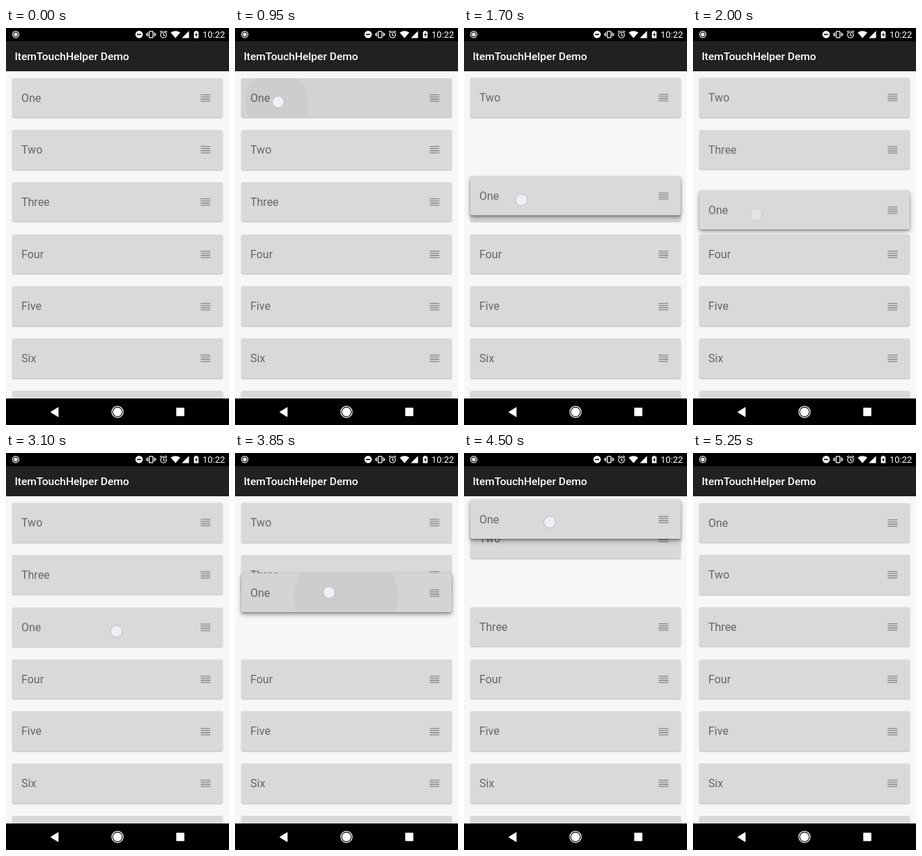
Recreate the animation shown at these times as an HTML page. Size 320x569 px, loop 5.3 s.

```html
<!DOCTYPE html>
<html lang="en">
<head>
<meta charset="utf-8">
<title>ItemTouchHelper Demo</title>
<style>
:root { --loop: 5300ms linear infinite; --soft: cubic-bezier(.37, 0, .63, 1); }
html, body { margin: 0; width: 100%; height: 100%; overflow: hidden; background: #000; }
body { font-family: Roboto, sans-serif; }
#stage { position: relative; width: 320px; height: 569px; overflow: hidden; background: #000; }
#status, #nav { position: absolute; left: 0; width: 320px; }
#status { top: 0; height: 19px; }
#nav { top: 531px; height: 38px; }
#bar {
  position: absolute; top: 19px; width: 320px; height: 43px; background: #212121;
  box-sizing: border-box; padding-left: 12.4px;
  color: #fff; font-size: 15.56px; font-weight: 500; line-height: 44px; white-space: nowrap;
}
#list { position: absolute; top: 62px; width: 320px; height: 469px; overflow: hidden; background: #f7f7f7; }
.card {
  position: absolute; left: 9px; top: calc(9.5px + var(--i) * 74.7px); width: 301.5px; height: 56.5px;
  border-radius: 2.5px; background: #d9d9d9; box-shadow: 0 1px 2px rgba(0, 0, 0, .27);
  color: #666; font-size: 16px; line-height: 58px; text-indent: 13px;
}
.card svg { position: absolute; left: 267.5px; top: 19.3px; width: 18.67px; height: 18.67px; fill: #939393; }

#one { z-index: 2; animation: drag var(--loop); }
#one::after {
  content: ""; position: absolute; inset: 0; border-radius: 2.5px; opacity: 0;
  box-shadow: 0 3px 6px rgba(0, 0, 0, .4); animation: lift var(--loop);
}
#two { animation: two var(--loop); }
#three { animation: three var(--loop); }
.press {
  position: absolute; inset: 0; overflow: hidden; border-radius: 2.5px; opacity: 0;
  background: rgba(0, 0, 0, .025); animation: press var(--loop);
}
.press i {
  position: absolute; left: -75px; top: -41px; width: 150px; height: 150px; border-radius: 50%;
  background: rgba(0, 0, 0, .035); animation: ripple var(--loop);
}
#dot {
  position: absolute; z-index: 3; left: -9px; top: -71px; width: 18px; height: 18px; box-sizing: border-box;
  border-radius: 50%; background: #f0f0f3; border: 1px solid #b4b2d0; opacity: 0;
  animation: finger var(--loop), touch var(--loop);
}

@keyframes drag {
  0%, 18.87% { transform: translateY(0); }
  20.75% { transform: translateY(10px); }
  26.42% { transform: translateY(66.3px); }
  32.83% { transform: translateY(150px); animation-timing-function: ease-out; }
  35.85% { transform: translateY(161.5px); }
  37.36% { transform: translateY(161.5px); animation-timing-function: var(--soft); }
  42.08%, 68.87% { transform: translateY(149.4px); }
  72.64% { transform: translateY(100.4px); }
  75.47% { transform: translateY(74.5px); }
  83.96% { transform: translateY(0); }
  84.91% { transform: translateY(-5px); animation-timing-function: ease-out; }
  88.68% { transform: translateY(-9px); }
  90.57% { transform: translateY(-9px); animation-timing-function: var(--soft); }
  95.28%, 100% { transform: translateY(0); }
}
@keyframes lift {
  0%, 18.4% { opacity: 0; }
  20.75%, 37.36% { opacity: 1; }
  42.08%, 68.4% { opacity: 0; }
  70.5%, 90.57% { opacity: 1; }
  95.28%, 100% { opacity: 0; }
}
@keyframes two {
  0%, 27.36% { transform: translateY(0); animation-timing-function: var(--soft); }
  32.08% { transform: translateY(-74.7px); }
  83.96% { transform: translateY(-74.7px); animation-timing-function: var(--soft); }
  88.68%, 100% { transform: translateY(0); }
}
@keyframes three {
  0%, 32.83% { transform: translateY(0); animation-timing-function: var(--soft); }
  37.55% { transform: translateY(-74.7px); }
  75.47% { transform: translateY(-74.7px); animation-timing-function: var(--soft); }
  80.19%, 100% { transform: translateY(0); }
}
@keyframes press {
  0%, 9.43% { opacity: 0; }
  11.3%, 19.8% { opacity: 1; }
  25.5%, 59.43% { opacity: 0; }
  61.3%, 72.64% { opacity: 1; }
  76.4%, 100% { opacity: 0; }
}
@keyframes ripple {
  0%, 9.43% { transform: translateX(51px) scale(0); }
  23.6%, 28% { transform: translateX(51px) scale(1); }
  28.01%, 59.43% { transform: translateX(150px) scale(0); }
  72.64%, 100% { transform: translateX(150px) scale(1); }
}
@keyframes finger {
  0%, 8.49% { transform: translate(61px, 106px); }
  18.87% { transform: translate(62px, 106px); }
  20.75% { transform: translate(63px, 116px); }
  26.42% { transform: translate(69.5px, 171.5px); }
  32.83% { transform: translate(84px, 256px); animation-timing-function: ease-out; }
  35.85%, 40% { transform: translate(90.5px, 267.5px); }
  40.01%, 58.49% { transform: translate(158.5px, 255.5px); }
  68.87% { transform: translate(157px, 253px); }
  72.64% { transform: translate(135px, 200px); }
  75.47% { transform: translate(130px, 178px); }
  83.96% { transform: translate(124px, 104px); }
  84.91% { transform: translate(123px, 99px); animation-timing-function: ease-out; }
  88.68%, 100% { transform: translate(122px, 95px); }
}
@keyframes touch {
  0%, 8.48% { opacity: 0; }
  8.49%, 36.98% { opacity: 1; }
  38.49%, 58.48% { opacity: 0; }
  58.49%, 90.57% { opacity: 1; }
  92.45%, 100% { opacity: 0; }
}
</style>
</head>
<body>
<div id="stage">
  <svg id="status" width="320" height="19" fill="#fff">
    <circle cx="14" cy="9.3" r="4.6" fill="#333" stroke="#c8c8c8" stroke-width="1.4"/>
    <circle cx="14" cy="9.3" r="2.6" fill="#eee"/>
    <circle cx="191" cy="9.3" r="5.3"/>
    <path d="M188 8.5h6v1.6h-6z" fill="#000"/>
    <g fill="none" stroke="#fff" stroke-width="1.2">
      <rect x="205.6" y="4.8" width="5.2" height="9" rx=".6"/>
      <path d="M203.5 6.3v6M212.9 6.3v6M201.7 7.6v3.4M214.7 7.6v3.4"/>
      <circle cx="226" cy="9.8" r="4.2"/>
      <path d="M226 7.2v2.9l2 1.2M221 6l2.5-2.1M231 6l-2.5-2.1"/>
    </g>
    <path d="M236.3 6.4Q243.2 1.9 250.1 6.4L243.2 14.6z"/>
    <path d="M262.6 4.2v10.2h-10.2z"/>
    <path d="M269.7 5.2h1.8v-1.1h3v1.1h1.8v9.3h-6.6z"/>
    <path d="M273.6 6.2l-2.4 4h1.5v3l2.3-4.1h-1.4z" fill="#000"/>
    <text x="282" y="14" font-size="13">10:22</text>
  </svg>
  <div id="bar">ItemTouchHelper Demo</div>
  <div id="list"><div id="dot"></div></div>
  <svg id="nav" width="320" height="38" fill="#fff">
    <path d="M64.2 19.5L75 12.8v13.4z" stroke="#fff" stroke-width=".8" stroke-linejoin="round"/>
    <circle cx="160" cy="19.2" r="8.1" fill="none" stroke="#fff" stroke-width="1.2"/>
    <circle cx="160" cy="19.2" r="6.3"/>
    <rect x="244.3" y="13.2" width="11.6" height="12" rx=".6"/>
  </svg>
</div>
<script>
const list = document.getElementById("list");
const handle = '<svg viewBox="0 0 24 24"><path d="M3 5h18v2H3zM3 9h18v2H3zM3 13h18v2H3zM3 17h18v2H3z"/></svg>';

["One", "Two", "Three", "Four", "Five", "Six", "Seven"].forEach((name, i) => {
  const card = document.createElement("div");
  card.className = "card";
  card.id = name.toLowerCase();
  card.style.setProperty("--i", i);
  card.innerHTML = (i ? "" : '<div class="press"><i></i></div>') + name + handle;
  list.append(card);
});
</script>
</body>
</html>
```
